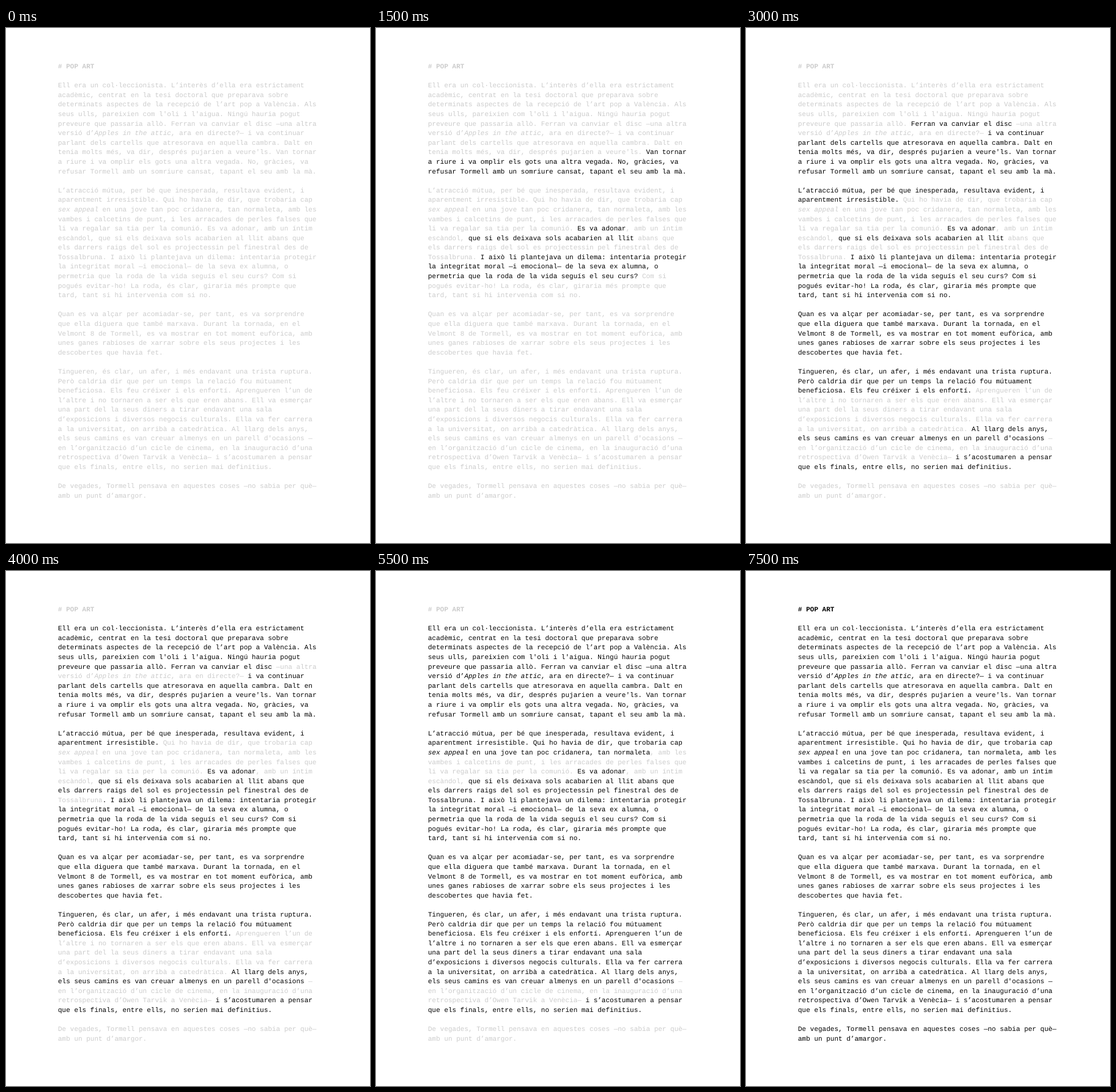
Recreate the animation shown at these times as an HTML page. Size 595 px wide and 842 px high, loop 8000 ms.

```html
<!DOCTYPE html>
<html lang="ca">
<head>
<meta charset="utf-8">
<title>Pop art</title>
<style>
@property --k { syntax: "<number>"; inherits: true; initial-value: 0; }

html, body {
  margin: 0;
  width: 100%;
  height: 100%;
  overflow: hidden;
  background: #fff;
}

/* --k counts half seconds, 0 to 15 */
pre {
  position: absolute;
  left: 85px;
  top: 57px;
  margin: 0;
  font: 11px/15.6px "Liberation Mono", monospace;
  text-rendering: geometricPrecision;
  font-variant-ligatures: none;
  animation: tick 8s steps(16) infinite;
}

@keyframes tick {
  from { --k: 0; }
  to { --k: 16; }
}

/* --t: step from which the text is black; --b: one earlier step where it shows briefly */
span {
  --on: calc(
    clamp(0, var(--k) - var(--t) + 1, 1)
    + clamp(0, var(--k) - var(--b, 99) + 1, 1)
    - clamp(0, var(--k) - var(--b, 99), 1)
  );
  --c: calc(204 * (1 - var(--on)));
  color: rgb(var(--c), var(--c), var(--c));
}
</style>
</head>
<body>
<pre>
<span style="--t:15"><b># POP ART</b></span>

<span style="--t:7">Ell era un col·leccionista.</span> <span style="--t:8">L’interès d’ella era estrictament
acadèmic, centrat en la tesi doctoral que preparava sobre
determinats aspectes de la recepció de l’art pop a València. Als
seus ulls, pareixien com l'oli i l'aigua. Ningú hauria pogut
preveure que passaria allò.</span> <span style="--t:6">Ferran va canviar el disc</span> <span style="--t:10">—una altra
versió d’<i>Apples in the attic</i>, ara en directe?—</span> <span style="--t:6">i va continuar
parlant dels cartells que atresorava en aquella cambra. Dalt en
tenia molts més, va dir, després pujarien a veure'ls.</span> <span style="--t:3">Van tornar
a riure i va omplir els gots una altra vegada. No, gràcies, va
refusar Tormell amb un somriure cansat, tapant el seu amb la mà.</span>

<span style="--t:5">L’atracció mútua, per bé que inesperada, resultava evident, i
aparentment irresistible.</span> <span style="--t:9">Qui ho havia de dir, que trobaria cap
<i>sex appeal</i> en una jove tan poc cridanera, tan normaleta</span><span style="--t:12;--b:9">, amb les</span>
<span style="--t:12">vambes i calcetins de punt, i les arracades de perles falses que
li va regalar sa tia per la comunió.</span> <span style="--t:1">Es va adonar</span><span style="--t:12">, amb un íntim
escàndol,</span> <span style="--t:1">que si els deixava sols acabarien al llit</span> <span style="--t:7;--b:1">abans q</span><span style="--t:7">ue
els darrers raigs del sol es projectessin pel finestral des de</span>
<span style="--t:10">Tossalbruna</span><span style="--t:7">.</span> <span style="--t:2">I això li plantejava un dilema: intentaria protegir
la integritat moral —i emocional— de la seva ex alumna, o
permetria que la roda de la vida seguís el seu curs?</span> <span style="--t:4">Com si
pogués evitar-ho! La roda, és clar, giraria més prompte que
tard, tant si hi intervenia com si no.

Quan es va alçar per acomiadar-se, per tant, es va sorprendre
que ella diguera que també marxava. Durant la tornada, en el
Velmont 8 de Tormell, es va mostrar en tot moment eufòrica, amb
unes ganes rabioses de xarrar sobre els seus projectes i les
descobertes que havia fet.

Tingueren, és clar, un afer, i més endavant una trista ruptura.
Però caldria dir que per un temps la relació fou mútuament
beneficiosa. Els feu créixer i els enfortí.</span> <span style="--t:11">Aprengueren l’un de
l’altre i no tornaren a ser els que eren abans. Ell va esmerçar
una part del la seus diners a tirar endavant una sala
d’exposicions i diversos negocis culturals. Ella va fer carrera
a la universitat, on arribà a catedràtica.</span> <span style="--t:4">Al llarg dels anys,
els seus camins es van creuar almenys en un parell d'ocasions</span> <span style="--t:13">—
en l’organització d’un cicle de cinema, en la inauguració d’una
retrospectiva d’Owen Tarvik a Venècia—</span> <span style="--t:4">i s’acostumaren a pensar
que els finals, entre ells, no serien mai definitius.</span>

<span style="--t:14">De vegades, Tormell pensava en aquestes coses —no sabia per què—
amb un punt d’amargor.</span></pre>
</body>
</html>
```
